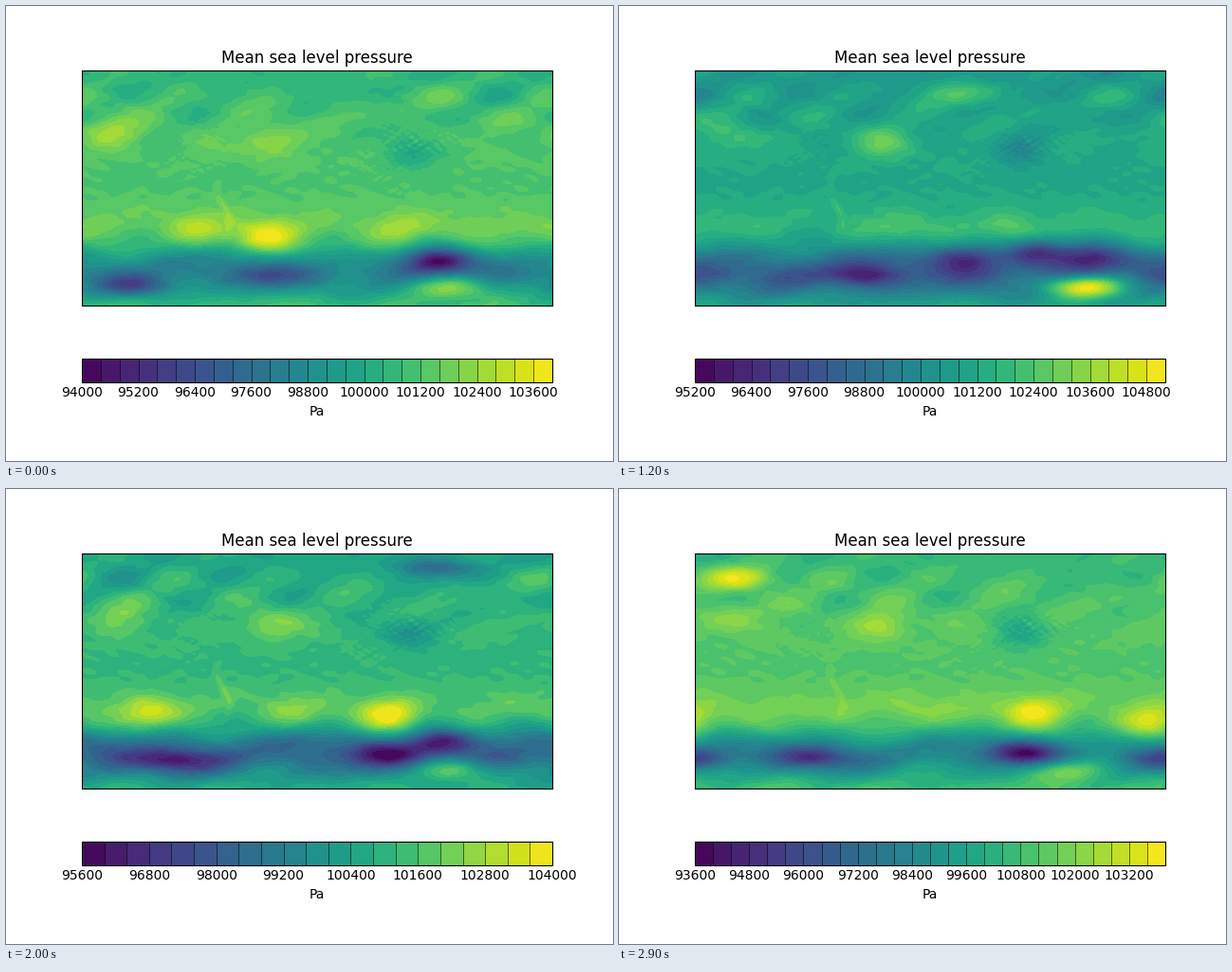
A matplotlib script that plays this animation: 640x480 px, repeating every 3000 ms.

```python
import numpy as np
import matplotlib.pyplot as plt
from matplotlib.animation import FuncAnimation

W, H, DPI = 640, 480, 100
LEFT, TOP, WIDTH, HEIGHT = 80, 68.32, 496, 248
FRAMES, STEP = 30, 400

# Map grid in stage pixels; pressures below are hPa relative to 1000.
xs = np.linspace(LEFT, LEFT + WIDTH, 249)
ys = np.linspace(TOP, TOP + HEIGHT, 125)
X, Y = np.meshgrid(xs, ys)
EQUATOR = TOP + HEIGHT / 2
LAT = (EQUATOR - Y) / (HEIGHT / 2)
STORMS = np.sin(0.75 * np.pi * LAT) ** 2
DRIFT = 6 * STORMS

# Zonal mean from north to south pole, and cells (x, y, value) that stay put.
ZONAL = [5, 6, 9, 10, 11, 12, 12, 11, 12, 15, 19, 8, -12, -20, -6, 9]
STANDING = [(425, 153, -3), (278, 143, 26), (120, 137, 22),
            (415, 238, 26), (300, 234, 23), (470, 297, 18)]

# Main highs and lows of a few days; the days between blend them.
DAYS = {
    0: [(455, 269, -58), (274, 246, 37), (140, 296, -38),
        (270, 285, -36), (110, 132, 27), (202, 236, 27)],
    4: [(108, 301, -51), (285, 271, -42), (460, 268, -38),
        (280, 140, 37), (210, 245, 34), (190, 270, 24)],
    12: [(255, 285, -46), (365, 265, -36), (439, 258, -35),
         (495, 265, -38), (490, 296, 49), (365, 92, 25)],
    16: [(165, 269, -45), (338, 283, -45), (510, 273, -38),
         (375, 246, 38), (88, 245, 28), (255, 117, -13)],
    20: [(173, 286, -43), (400, 279, -40), (460, 266, -42),
         (405, 240, 39), (150, 237, 34), (455, 83, -15)],
    25: [(147, 285, -54), (350, 281, -46), (487, 272, -43),
         (77, 260, 37), (130, 132, 34), (465, 237, 30)],
    29: [(206, 283, -55), (425, 278, -61), (84, 285, -44),
         (135, 94, 33), (437, 237, 37), (563, 248, 33)],
}


def wrap(dx):
    return (dx + WIDTH / 2) % WIDTH - WIDTH / 2


def bump(x, y, cx, cy, sx, sy):
    """Gaussian bump, periodic in longitude."""
    return np.exp(-0.5 * ((wrap(x - cx) / sx) ** 2 + ((y - cy) / sy) ** 2))


def cell(x, y, cx, cy):
    """Pressure cell, flatter and wider towards the poles."""
    a = abs(cy - EQUATOR) / (HEIGHT / 2)
    return bump(x, y, cx, cy, 19 + 14 * a * a, 15 - 8 * a)


row = np.interp(ys, np.linspace(TOP, TOP + HEIGHT, len(ZONAL)), ZONAL)
kernel = np.exp(-0.5 * (np.arange(-6, 7) / 2.5) ** 2)
zonal = np.convolve(np.pad(row, 6, mode="edge"), kernel / kernel.sum(), "valid")


class Weather:
    """Cells whose amplitudes make their centres take the given values."""

    def __init__(self, at, moving):
        still = [s for s in STANDING
                 if all(np.hypot(wrap(s[0] - m[0]), s[1] - m[1]) > 30 for m in moving)]
        cx, cy, value = np.array(moving + still, float).T
        self.at, self.centres = at, list(zip(cx, cy))
        self.low = 4 * np.floor(value.min() / 4)
        self.high = 4 * np.ceil(value.max() / 4)
        g = np.array([cell(cx, cy, *c) for c in self.centres]).T
        miss = value - np.interp(cy, ys, zonal)
        self.amps = np.linalg.solve(g.T @ g + 0.03 * np.eye(len(cx)), g.T @ miss)

    def anomaly(self, frame):
        x = X - DRIFT * (frame - self.at)
        return sum(a * cell(x, Y, *c) for a, c in zip(self.amps, self.centres))


days = [Weather(at, moving) for at, moving in DAYS.items()]
rng = np.random.default_rng(4)


def ripples(count, lo, hi):
    """Random plane waves, periodic across the map."""
    kx = rng.integers(lo, hi, count) * rng.choice([-1, 1], count)
    return list(zip(kx, 2 * rng.uniform(lo, hi, count), rng.uniform(0, 2 * np.pi, count)))


def texture(waves, shift=0):
    u, v = 2 * np.pi * (X - shift) / WIDTH, np.pi * Y / HEIGHT
    return sum(np.cos(kx * u + ky * v + ph) for kx, ky, ph in waves) / np.sqrt(len(waves))


# Fixed traces of terrain: the Andes, the Asian highlands and other land.
ridge_x = 229 - 7 * np.cos((Y - 192) / 36 * np.pi)
terrain = 6 * np.exp(-0.5 * ((X - ridge_x) / 2.5) ** 2 - 0.5 * ((Y - 214) / 17) ** 2)
rough = texture(ripples(50, 16, 55))
for x, y, sx, sy, amp in [(440, 146, 26, 10, 4), (395, 160, 30, 30, 1), (200, 145, 25, 25, 1)]:
    terrain += amp * rough * bump(X, Y, x, y, sx, sy)
swell, eddies = ripples(40, 5, 20), ripples(30, 2, 6)


def pressure(frame):
    i = max(k for k, d in enumerate(days) if d.at <= frame)
    a, b = days[i], days[min(i + 1, len(days) - 1)]
    u = (frame - a.at) / max(b.at - a.at, 1)
    field = zonal[:, None] + terrain + 0.8 * texture(swell, 2 * frame)
    field = field + 5 * STORMS * texture(eddies, 5 * frame)
    field = field + np.cos(np.pi * u / 2) * a.anomaly(frame)
    if u > 0:
        field = field + np.sin(np.pi * u / 2) * b.anomaly(frame)
    low, high = (100000 + round(((1 - u) * p + u * q) / 4) * STEP
                 for p, q in ((a.low, b.low), (a.high, b.high)))
    return np.clip(100000 + 100 * field, low + 20, high - 20), low, high


fig = plt.figure(figsize=(W / DPI, H / DPI), dpi=DPI, facecolor="white")


def stage_axes(top, height):
    return fig.add_axes([LEFT / W, 1 - (top + height) / H, WIDTH / W, height / H])


def draw(frame):
    fig.clear()
    ax, cax = stage_axes(TOP, HEIGHT), stage_axes(371.76, 24.8)
    field, low, high = pressure(frame)
    levels = np.arange(low, high + STEP, STEP)
    shades = ax.contourf(X, Y, field, levels=levels, cmap="viridis", vmin=low, vmax=high)
    ax.set(xlim=(LEFT, LEFT + WIDTH), ylim=(TOP + HEIGHT, TOP), xticks=[], yticks=[])
    ax.set_title("Mean sea level pressure")
    bar = fig.colorbar(shades, cax=cax, orientation="horizontal", drawedges=True,
                       ticks=levels[::3], format="%d")
    bar.ax.tick_params(length=0)
    bar.ax.minorticks_off()
    bar.set_label("Pa")
    return []


anim = FuncAnimation(fig, draw, frames=FRAMES, interval=100, init_func=lambda: [],
                     repeat=True, repeat_delay=0, blit=False)
plt.show()
```
